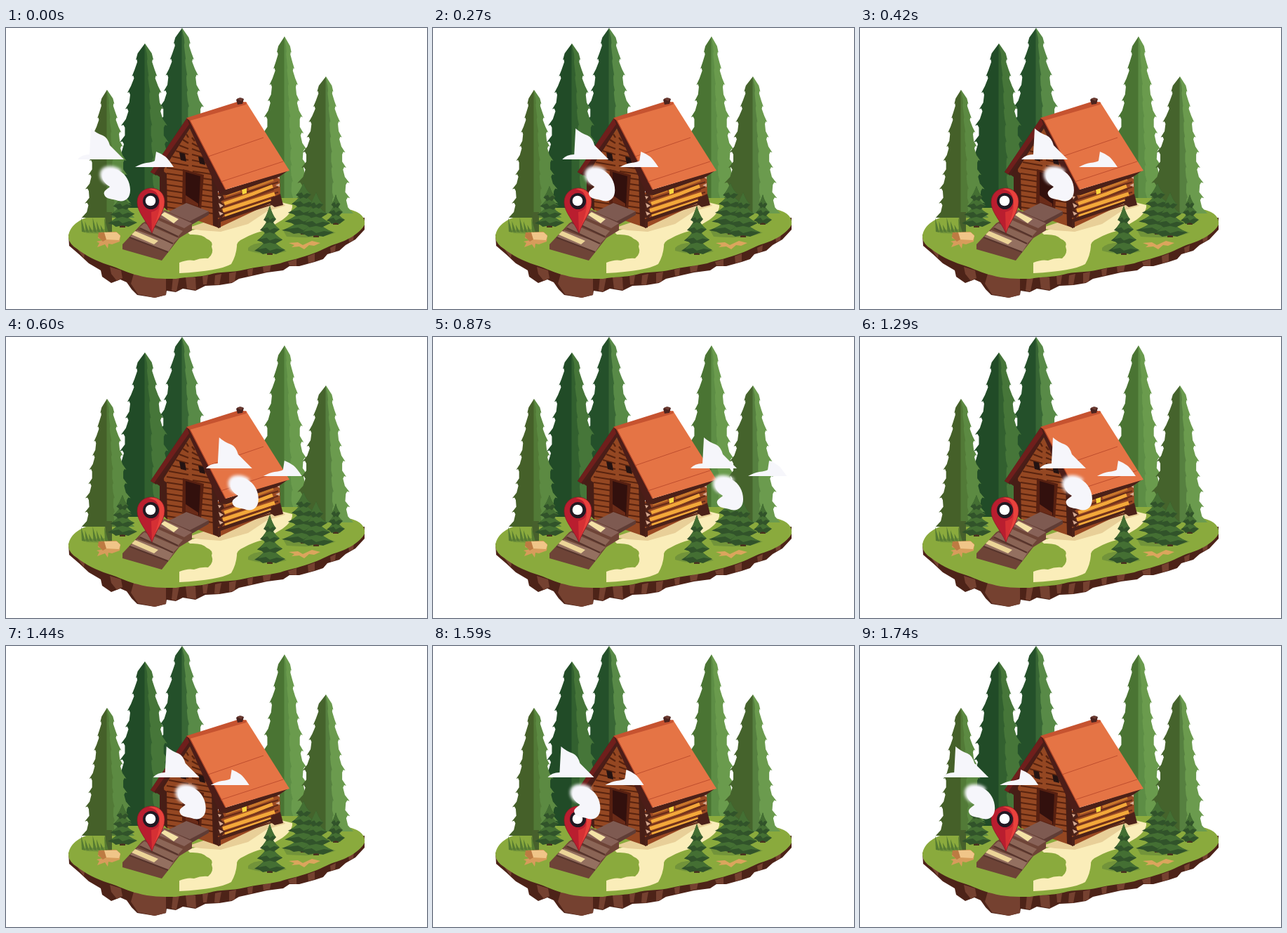
These frames come from a looping animation (600x400 px, 1770 ms). An HTML page with a canvas:

```html
<!DOCTYPE html>
<html lang="en">
<head>
<meta charset="utf-8">
<title>Forest cabin</title>
<style>
html, body { margin: 0; width: 100%; height: 100%; overflow: hidden; background: #fff; }
canvas { display: block; width: 600px; height: 400px; }
</style>
</head>
<body>
<canvas id="stage" width="600" height="400"></canvas>
<script>
const start = performance.now();
const LOOP = 1770, TICK = 30;
const SLACK = 2; // absorbs timer rounding at tick edges

const view = document.getElementById('stage').getContext('2d');
const scene = document.createElement('canvas');
scene.width = 600;
scene.height = 400;
const g = scene.getContext('2d');

const fill = (d, color, c = g) => { c.fillStyle = color; c.fill(new Path2D(d)); };
const line = (d, color, width = 1) => {
  g.strokeStyle = color;
  g.lineWidth = width;
  g.stroke(new Path2D(d));
};
const disc = (x, y, r, color) => {
  g.fillStyle = color;
  g.beginPath();
  g.arc(x, y, r, 0, Math.PI * 2);
  g.fill();
};

// One side of a fir: drooping branch tips on a widening edge
function halfFir(x, top, bottom, width, side, tiers, color, scale = 1) {
  const step = (bottom - top) / tiers;
  g.fillStyle = color;
  g.beginPath();
  g.moveTo(x, top);
  for (let i = 1; i <= tiers; i++) {
    const w = width * (i / tiers) ** 0.6 * (i % 2 ? 1.03 : 0.97) * scale;
    const y = top + step * i;
    g.lineTo(x + side * w * 0.8, y - step * 0.4);
    g.lineTo(x + side * w, y);
    if (i < tiers) {
      g.lineTo(x + side * w * 0.9, y - 1);
      g.lineTo(x + side * w * 0.84, y + step * 0.12);
    }
  }
  g.lineTo(x, bottom);
  g.fill();
}

function fir(x, top, bottom, left, right, tiers, dark, mid, light) {
  halfFir(x, top, bottom, left, -1, tiers, dark);
  halfFir(x, top, bottom, right, 1, tiers, light);
  halfFir(x - 0.5, top, bottom, right, 1, tiers, mid, 0.34);
}

// Low fir with shaded, overlapping skirts
function bush(x, top, bottom, half, tiers) {
  const step = (bottom - top) / (tiers + 0.6);
  fill(`M${x - 4} ${bottom - 5}h8v8h-8Z`, '#4a3320');
  for (let i = tiers; i >= 1; i--) {
    const y = top + step * (i + 0.6), up = top + step * (i - 1);
    const w = half * (i / tiers) ** 0.65;
    fill(`M${x} ${up}Q${x - w * 0.45} ${y - step * 0.7} ${x - w} ${y - 3}L${x - w * 0.65} ${y - 1}
      L${x - w * 0.45} ${y + 2}L${x} ${y}L${x + w * 0.4} ${y + 2}L${x + w * 0.7} ${y - 1}L${x + w} ${y - 4}
      Q${x + w * 0.4} ${y - step * 0.7} ${x} ${up}Z`, '#31532a');
    fill(`M${x} ${up}L${x - w * 0.75} ${y - 5}L${x - w * 0.25} ${y - 7}L${x} ${y - 3}
      L${x + w * 0.45} ${y - 6}L${x + w} ${y - 4}Q${x + w * 0.4} ${y - step * 0.7} ${x} ${up}Z`, '#446f33');
  }
}

function drawGround() {
  fill(`M89 294L90 310L104 322L118 335L135 345L137 354L150 363L163 358L172 362L179 372L187 380L212 384L228 380
    L229 374L242 376L252 371L270 374L284 367L304 366L322 363L332 357L350 353L372 348L395 345L404 339L418 339
    L440 333L452 329L458 322L475 317L484 309L498 301L511 287L511 270Z`, '#4d2318');
  fill(`M148 340L164 345L166 356L158 360L150 350ZM182 350L228 354L228 380L212 384L188 379L178 364Z
    M238 354L247 355L243 375L236 374ZM256 355L270 355L271 373L258 371ZM280 353L288 352L286 365L281 365Z
    M298 352L307 350L304 366L297 365ZM318 349L328 347L326 361L318 363ZM344 344L352 342L351 352L345 353Z
    M366 340L378 336L376 346L367 348ZM402 333L414 329L414 339L404 338ZM430 325L440 321L440 332L431 335Z
    M462 313L470 309L469 318L463 320ZM488 299L496 293L495 302L489 305ZM102 315L112 321L111 328Z`, '#754130');
  fill(`M89 298C89 284 103 270 130 266L240 242L400 238L486 258C504 260 513 270 511 280
    C505 292 486 303 468 308C456 312 450 317 432 323C415 329 402 331 391 335C374 339 355 340 340 344
    C320 349 305 346 290 351C274 355 259 354 242 357C222 357 205 357 188 352
    C173 349 162 342 145 337C129 332 112 323 102 315Q90 308 89 298Z`, '#8aaa3d');
  fill(`M258 290L302 278L392 248L408 252Q409 262 394 273L369 288Q350 293 340 299Q328 304 329 311
    Q328 324 321 336Q304 346 247 349V334Q259 329 268 331Q278 327 288 328Q297 321 293 311
    Q296 304 286 300Q280 293 262 294Z`, '#faedb9');
  fill('M258 285L302 270L391 245L398 253L372 261L345 279L306 290L278 288Z', '#e8cf98');
  fill('M345 313Q355 303 382 307L400 318Q370 325 345 317Z', '#72943a');
  fill('M395 288Q420 282 470 291Q450 301 400 297ZM108 288L146 286L144 293L115 292Z', '#72943a');
}

function drawFirs() {
  fir(251, 0, 180, 41, 40, 8, '#24502a', '#386735', '#588a47');
  fir(397, 12, 242, 43, 38, 10, '#4a7433', '#5d8d45', '#6a9b4d');
  fir(198, 22, 256, 50, 47, 10, '#214b27', '#32602f', '#467639');
  fir(144, 88, 270, 35, 38, 9, '#456029', '#527a37', '#5c8a42');
  fir(456, 69, 264, 46, 38, 9, '#45632c', '#568040', '#6b9b4e');
  fill('M141 262H151V291H142Z', '#47602c');
  bush(166, 225, 281, 21, 4);
  bush(470, 237, 277, 13, 3);
  for (let i = 0; i < 7; i++) {
    const x = 108 + i * 5.5;
    fill(`M${x} 290L${x - 1} ${270 + i % 3 * 5}L${x + 5} 291Z`, '#567b32');
  }
}

function drawCabin() {
  // Front wall
  fill('M262 143L213 208L219 212V249L230 259L240 180Z', '#471e16');
  fill('M262 143L225 201L229 259L302 284V225Z', '#944722');
  for (let i = 0; i < 14; i++) {
    const y = 153 + i * 8;
    const left = Math.max(229, 257 - i * 5), right = Math.min(301, 269 + i * 5);
    line(`M${left} ${y - 2}L${(left + right) / 2 - 3} ${y + 3}M${(left + right) / 2 + 2} ${y + 3}L${right} ${y + 8}`,
      '#58230f', 2.2);
  }
  fill('M219 201L229 207L230 260L219 249ZM293 210L302 224V284L295 281Z', '#471e16');
  fill('M252 201L282 209L278 258L251 249Z', '#572011');
  fill('M256 205L277 211L275 254L256 247Z', '#32100d');
  fill('M256 238L274 250V254L256 248Z', '#6a2b18');
  fill('M247 177L255 179L257 190L249 188ZM274 183L282 185L284 195L276 193Z', '#241312');

  // Side wall
  fill('M302 234L390 207L391 238L378 249L302 285Z', '#9b4a23');
  for (let i = 0; i < 6; i++) {
    const y = 239 + i * 7.2;
    line(`M304 ${y}L388 ${y - 27}`, '#622a18', 2);
  }
  line('M311 250L352 236L380 225M309 260L383 236M312 268L378 246', '#f3a83a', 5);
  line('M313 238L334 231M346 229L381 216', '#c8772b', 4);
  line('M311 264L382 240M311 255L382 230', '#6c2f1b', 1.4);
  fill('M302 272L378 246V242L391 236L395 252L383 255L376 250L306 276V284L302 285Z', '#4c2219');
  fill('M302 237L308 235L311 243L306 247L312 253L306 259L312 264L307 271L302 270Z', '#4c2219');
  fill('M302 239L307 240L304 244ZM303 249L310 253L305 256ZM303 261L310 264L305 267ZM385 212L390 210L390 215ZM384 224L390 221L390 226Z',
    '#d7aa91');
  fill('M336 229L343 228L343 235L337 237Z', '#fbd63e');
  fill('M306 228L313 230L402 203L389 212L314 238L304 236Z', '#4b2018');

  // Roof and eaves
  fill('M258 128L206 205L214 210L262 143L304 236L313 230L265 132Z', '#4c1d18');
  fill('M258 128L206 205L211 208L261 137Z', '#6f1f1c');
  fill('M261 129L342 105L404 203L313 230Z', '#e57445');
  fill('M257 128L333 104L343 106L342 109L262 132Z', '#c65330');
  line('M288 183L367 156M306 219L395 190', '#bf4e2e', 1);
  line('M261 130L313 230', '#b94929', 1.2);
  fill('M328 102Q333 97 339 101L337 108L330 109Z', '#4b231e');
  fill('M329 101Q333 98 338 101L335 104Z', '#6d3b31');
}

function drawSteps() {
  fill('M231 262L257 249L289 261L262 278Z', '#7e5a51');
  fill('M231 262L262 275L289 261V266L263 281L232 267Z', '#5f3c35');
  fill('M213 267L226 259L265 278V288L247 299L222 331L166 315V308L194 278Z', '#6e4437');
  fill('M212 267L225 260L265 278L254 285Z', '#886258');
  fill('M202 276L209 270L252 289L245 297Z', '#8c6657');
  fill('M190 284L197 278L246 299L238 307Z', '#8a6455');
  fill('M176 298L187 288L239 307L231 319Z', '#947060');
  line('M203 277L245 297M191 285L238 307M176 298L231 319', '#56342c', 2);
  fill('M221 266L226 262L246 272L239 278Z', '#f4e2a6');
  fill('M179 294L184 289L217 303L211 308Z', '#ecd498');
}

function drawProps() {
  fill('M133 291L157 290L163 295L162 304L151 308L146 307L145 314L141 308L130 312L133 306L129 304L138 302L131 299Z', '#d79c5b');
  fill('M139 291L158 291L163 296L161 302L142 301Z', '#f0c588');
  fill('M132 291L140 291L143 301L138 304L131 297Z', '#bd7b42');
  fill('M403 306L416 305L423 309L436 303L448 306L439 310L432 309L425 315L418 311L407 312L411 309Z', '#dba55d');
  bush(424, 221, 291, 31, 5);
  bush(442, 234, 295, 25, 4);
  bush(376, 253, 320, 22, 4);

  // Map pin
  const shape = 'M207 228C196 228 187 236 187 248C187 262 200 274 208 292C214 274 226 263 226 247C226 236 218 228 207 228Z';
  fill(shape, '#b91e2f');
  fill('M207 228C218 228 226 236 226 247C226 263 214 274 208 292Q208 275 214 263Q222 250 217 239Q214 231 203 229Z', '#e8423c');
  fill('M207 262Q216 260 219 253Q219 263 208 291Z', '#d53034');
  line(shape, '#8a1b25', 0.8);
  disc(206.5, 246.5, 11.5, '#211923');
  disc(206, 246, 7.3, '#fff');
}

function drawClouds(shift) {
  const white = '#f6f6fb';
  view.save();
  view.translate(shift, 0);
  fill('M121 143Q129 150 138 153Q145 156 148 167L168 187H102Q108 180 119 180Z', white, view);
  fill('M214 176Q222 179 227 183Q231 186 239 198H184Q193 193 200 192Q209 191 212 189Z', white, view);
  view.filter = 'blur(2.2px)';
  fill('M134 207C135 195 153 194 164 202L159 222L143 222C138 220 133 214 134 207Z', white, view);
  view.filter = 'none';
  fill(`M138 207C143 199 153 199 161 203C171 208 177 219 177 231C177 243 169 248 160 246
    C152 243 142 244 140 237C138 232 145 229 148 226C141 222 135 215 138 207Z`, white, view);
  view.restore();
}

function render(now) {
  const n = Math.floor((Math.max(0, now - start) + SLACK) % LOOP / TICK);
  const shift = n <= 30 ? n * 9.14 : 274.2 - (n - 30) * 9.25;
  view.fillStyle = '#fff';
  view.fillRect(0, 0, 600, 400);
  view.drawImage(scene, 0, 0);
  drawClouds(shift);
  requestAnimationFrame(render);
}

drawGround();
drawFirs();
drawCabin();
drawSteps();
drawProps();
render(start);
</script>
</body>
</html>
```
